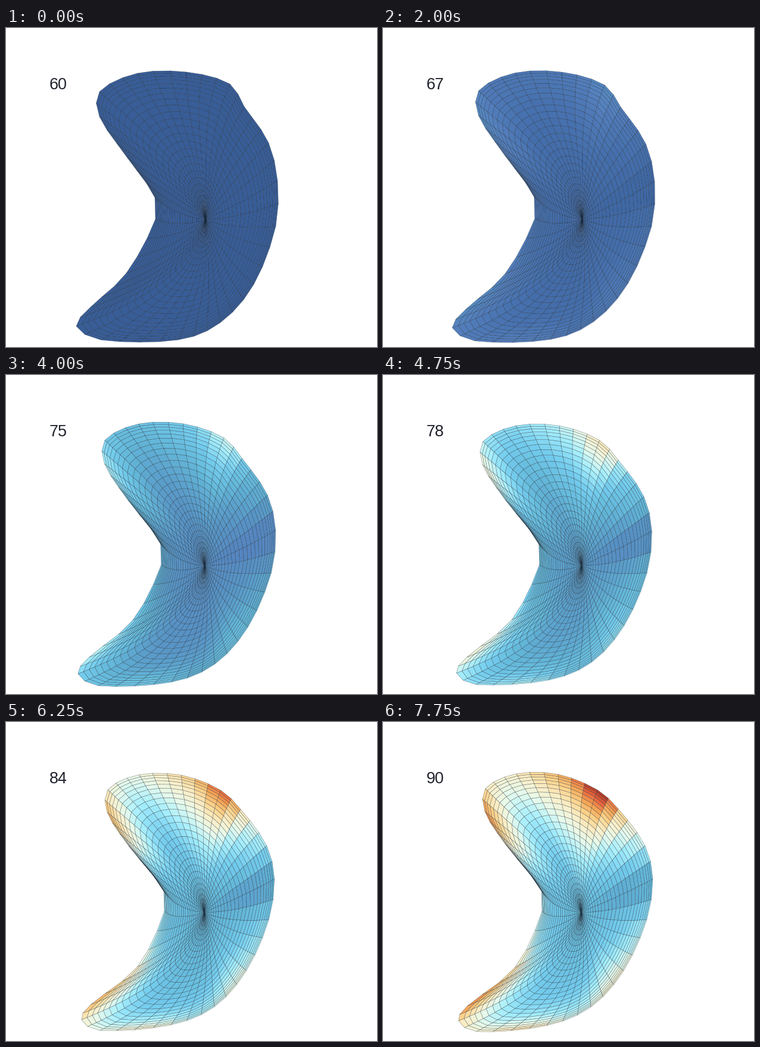
Recreate the animation shown at these times as a matplotlib script. Size 623 by 536 pixels, loop 8500 ms.

```python
import numpy as np
import matplotlib.pyplot as plt
from matplotlib.animation import FuncAnimation
from matplotlib.collections import PolyCollection
from matplotlib.colors import LinearSegmentedColormap

W, H, DPI = 623, 536, 100
SPOKES, RINGS = 50, 26
FIRST, LAST = 60, 90

# Key points of the rim, clockwise from the right:
# spoke, then x, y at the start and x, y at the end.
RIM_KEYS = np.array([
    (0, 453, 333, 443, 332), (3, 416, 431, 404, 418), (6, 360, 495, 349, 479),
    (9, 289, 524, 275, 510), (13, 159, 524, 157, 520), (15, 118, 501, 127, 502),
    (17, 142, 469, 142, 477), (20, 202, 412, 222, 412), (23, 251, 321, 267, 318),
    (24, 250, 285, 266, 283), (27, 203, 217, 206, 206), (30, 157, 149, 171, 150),
    (32, 157, 107, 172, 112), (35, 221, 76, 224, 87), (38, 303, 74, 294, 88),
    (41, 376, 94, 360, 114), (43, 400, 132, 395, 146), (46, 441, 193, 440, 208),
    (48, 456, 257, 453, 264)], float)
POLE_START, POLE_END = np.array([335, 321]), np.array([333, 319.5])

# Areas of strain: spoke, width in spokes, strength, rise to the rim, delay.
AREAS = [
    (38.5, 5, .28, .9, 2),
    (41, 2, .26, 2.5, 1),
    (29, 2.8, .34, 2, 1),
    (17, 3.2, .36, 2.5, 1),
    (10, 2.5, .2, 8, 1),
    (3.5, 2.2, .14, 1.6, 1),
    (47.5, 1.5, -.2, 1.2, 1),
]

CMAP = LinearSegmentedColormap.from_list("strain", [
    "#385d97", "#4069a6", "#5480be", "#5896c6", "#62b6d8", "#74cdee", "#a5eefc",
    "#e6faec", "#faeec8", "#fcd48c", "#f5a555", "#e8643c", "#a83426"])

spoke = np.arange(SPOKES)
angle = 2 * np.pi * (spoke + 1.1) / SPOKES


def hump(center, width):
    """Bell curve over the spokes, wrapping around the rim."""
    away = (spoke - center + SPOKES / 2) % SPOKES - SPOKES / 2
    return np.exp(-(away / width) ** 2)


def closed_curve(knots, points):
    """Smooth closed curve through the points, sampled at every spoke."""
    k = np.concatenate([[knots[-1] - SPOKES], knots, knots[:2] + SPOKES])
    p = np.concatenate([points[-1:], points, points[:2]])
    slope = (p[2:] - p[:-2]) / (k[2:] - k[:-2])[:, None]
    i = np.searchsorted(knots, spoke, side="right")
    span = (k[i + 1] - k[i])[:, None]
    t = (spoke - k[i])[:, None] / span
    ease = t * t * (3 - 2 * t)
    return (p[i] + (p[i + 1] - p[i]) * ease
            + span * t * (1 - t) * ((1 - t) * slope[i - 1] - t * slope[i]))


def spread(u):
    """Rings crowd at the pole and the rim, but widen along the lower left."""
    u = u[:, None]
    widen = 1.2 * hump(19.5, 4) - .3
    return u - .05 * np.sin(2 * np.pi * u) - widen * u ** 4 * (1 - u)


rim_start = closed_curve(RIM_KEYS[:, 0], RIM_KEYS[:, 1:3])
rim_end = closed_curve(RIM_KEYS[:, 0], RIM_KEYS[:, 3:5])
radius = spread(np.linspace(0, 1, RINGS + 1))
radius_mid = spread((np.arange(RINGS) + .5) / RINGS)


def progress(step):
    """Starts briskly and settles softly."""
    s = step / (LAST - FIRST)
    return (np.sin(np.pi * s / 2) + (1 - np.cos(np.pi * s)) / 2) / 2


def mesh(step):
    m = progress(step)
    s = np.pi * step / (LAST - FIRST)
    swing, pulse = np.sin(2 * s), np.sin(s)
    pole = POLE_START + m * (POLE_END - POLE_START)
    x, y = (rim_start + m * (rim_end - rim_start) - pole).T
    x = x + (.015 * swing - .012 * pulse) * np.maximum(x, 0)
    x = x - (.012 * swing + .014 * pulse) * np.maximum(y, 0)
    y = y * (1 + .012 * swing + .002 * pulse)
    rim = np.stack([x, y], axis=1)

    # Each spoke leaves the pole along a tall ellipse and bends to the rim.
    sin, cos = np.sin(angle), np.cos(angle)
    lean = np.where(sin < 0, 44 * sin, -26 * sin)
    near = np.stack([26 * cos + .2 * lean, 92 * sin], axis=1)
    far = rim / 3 + np.stack([48 * cos + lean, 130 * sin], axis=1) * 2 / 3
    t = radius[:, :, None]
    return (pole + 3 * t * (1 - t) ** 2 * near
            + 3 * t ** 2 * (1 - t) * far + t ** 3 * rim)


def quads(points):
    nxt = np.roll(points, -1, axis=1)
    cells = np.stack([points[:-1], points[1:], nxt[1:], nxt[:-1]], axis=2)
    return cells.reshape(-1, 4, 2)


def shades(step):
    m = progress(step)
    level = m * (.37 + .15 * radius_mid ** 3)
    for center, width, strength, rise, delay in AREAS:
        level = level + m ** delay * strength * hump(center, width) * radius_mid ** rise
    return CMAP(np.clip(level, 0, 1)).reshape(-1, 4)


fig = plt.figure(figsize=(W / DPI, H / DPI), dpi=DPI, facecolor="white")
ax = fig.add_axes([0, 0, 1, 1])
ax.set_xlim(0, W)
ax.set_ylim(H, 0)
ax.axis("off")

surface = PolyCollection(quads(mesh(0)), facecolors=shades(0),
                         edgecolors=(.08, .12, .17, .6), linewidths=.34)
ax.add_collection(surface, autolim=False)
label = ax.text(72.5, 103, str(FIRST), family="Liberation Sans",
                fontsize=27 * 72 / DPI, color="#1f222c", va="baseline")


def draw(i):
    # The first value holds for two ticks and the last for three.
    step = min(max(i - 1, 0), LAST - FIRST)
    surface.set_verts(quads(mesh(step)))
    surface.set_facecolor(shades(step))
    label.set_text(str(FIRST + step))
    return surface, label


anim = FuncAnimation(fig, draw, frames=34, interval=250, repeat=True,
                     repeat_delay=0, blit=False)
plt.show()
```
